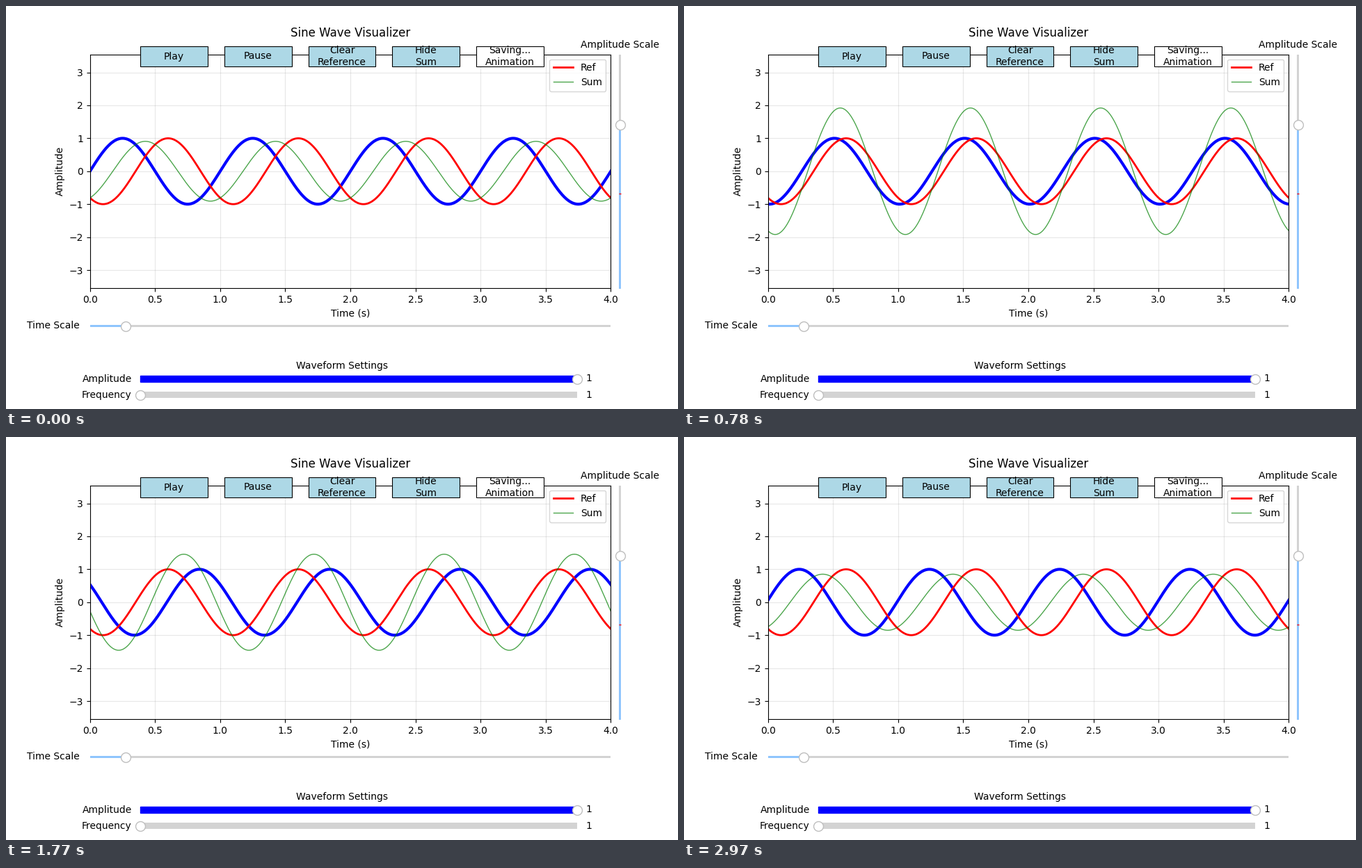
Recreate the animation shown at these times as a matplotlib script. Size 966 by 580 pixels, loop 3 s.

```python
import numpy as np
import matplotlib.pyplot as plt
from matplotlib.animation import FuncAnimation
from matplotlib.patches import Rectangle

W, H, DPI = 966, 580, 100
FRAMES, INTERVAL = 100, 30
REF_SHIFT = 0.35
Y_LIMIT = 10 ** 0.55
SKY = "#8fc5fd"

plt.rcParams["font.family"] = "DejaVu Sans"
fig = plt.figure(figsize=(W / DPI, H / DPI), dpi=DPI, facecolor="white")

# Plot area
ax = fig.add_axes([0.125, 0.3, 0.775, 0.58])
ax.set_xlim(0, 4)
ax.set_ylim(-Y_LIMIT, Y_LIMIT)
ax.set_xlabel("Time (s)")
ax.set_ylabel("Amplitude")
ax.set_title("Sine Wave Visualizer", y=1.05)
ax.grid(True, alpha=0.3)

t = np.linspace(0, 4, 1000)


def wave(shift):
    return np.sin(2 * np.pi * (t - shift))


ref = wave(REF_SHIFT)
main_line, = ax.plot(t, wave(0), color="blue", lw=3)
ax.plot(t, ref, color="red", lw=2, label="Ref")
sum_line, = ax.plot(t, wave(0) + ref, color="green", lw=1, alpha=0.7, label="Sum")
ax.legend(loc="upper right")

# Controls, laid out in pixels from the top left
ui = fig.add_axes([0, 0, 1, 1], zorder=5)
ui.set_xlim(0, W)
ui.set_ylim(H, 0)
ui.axis("off")


def box(x, y, w, h, color, edge="none", lw=0):
    ui.add_patch(Rectangle((x, y), w, h, facecolor=color, edgecolor=edge, lw=lw))


def label(x, y, text, ha="center", va="center"):
    ui.text(x, y, text, ha=ha, va=va, fontsize=10)


def handle(x, y):
    ui.plot([x], [y], "o", ms=10, mfc="white", mec="0.75", mew=1)


def button(x, text, color="lightblue"):
    box(x, 58, 96.6, 29, color, "black", 0.8)
    label(x + 48.3, 72.5, text)


def slider(x, y, w, h, value, name, color, edge="none", readout=""):
    box(x, y - h / 2, w, h, "lightgrey")
    if value > 0:
        box(x, y - h / 2, w * value, h, color, edge, 1 if edge != "none" else 0)
    handle(x + w * value, y)
    label(x - 0.02 * w, y, name, ha="right")
    label(x + 1.02 * w, y, readout, ha="left")


names = ["Play", "Pause", "Clear\nReference", "Hide\nSum", "Saving...\nAnimation"]
for i, name in enumerate(names):
    button(W * (0.2 + 0.125 * i), name, "white" if i == 4 else "lightblue")

slider(120.75, 460.5, 748.65, 3.4, 0.0678, "Time Scale", SKY)
slider(193.2, 536.5, 627.9, 8.7, 1, "Amplitude", "blue", "blue", "1")
slider(193.2, 559.7, 627.9, 8.7, 0, "Frequency", "blue", readout="1")
ui.text(W / 2, 522, "Waveform Settings", ha="center", fontsize=10)

# Vertical slider with its red start mark
box(881, 69.6, 3, 336.4, "lightgrey")
box(881, 170.5, 3, 236.5, SKY)
ui.plot([881, 884], [270, 270], color="red", lw=1, solid_capstyle="butt")
handle(882.5, 170.5)
label(882.5, 62.9, "Amplitude Scale", va="bottom")


def update(frame):
    y = wave(frame / FRAMES)
    main_line.set_ydata(y)
    sum_line.set_ydata(y + ref)
    return main_line, sum_line


anim = FuncAnimation(fig, update, frames=FRAMES, interval=INTERVAL,
                     repeat=True, repeat_delay=0, blit=False)
plt.show()
```
